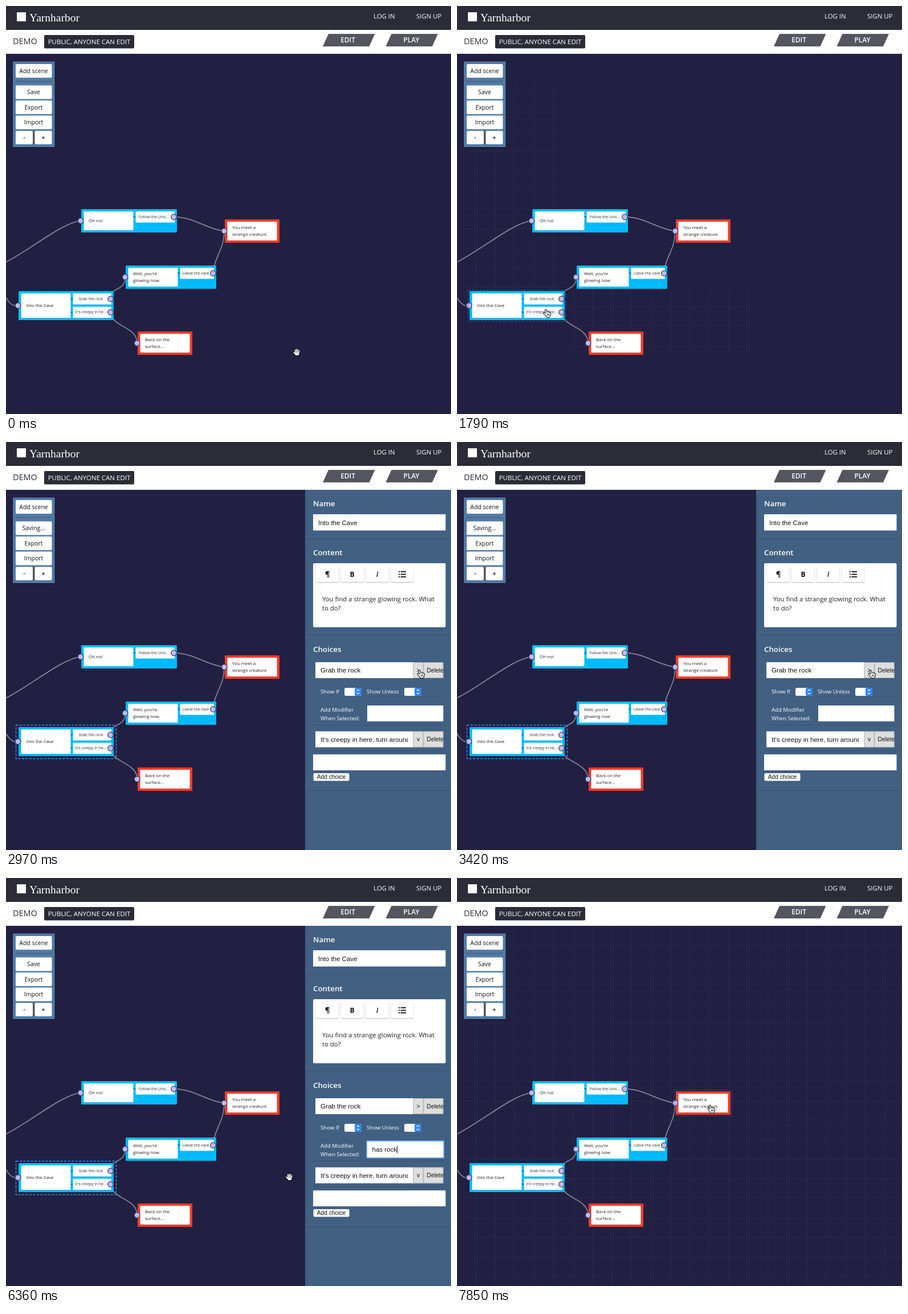
An HTML page with a canvas for the animation above (8000 ms loop, 781 px wide and 717 px high).

```html
<!DOCTYPE html>
<html lang="en">
<head>
<meta charset="utf-8">
<title>Scene editor</title>
<style>
  html, body { margin: 0; width: 100%; height: 100%; overflow: hidden; background: #222042; }
  canvas { display: block; width: 781px; height: 717px; }
</style>
</head>
<body>
<canvas id="stage"></canvas>
<script>
const W = 781, H = 717, LOOP = 8000, TICK = 148, LAST_TICK = 53;
const OPEN = 13, EXPAND = 20, FOCUS = 28, CLOSE = 43;
const UI = '"Open Sans", "Noto Sans", sans-serif';
const FORM = '"Liberation Sans", Arial, sans-serif';
const BLUE = '#00baff', RED = '#f43d2c';

const canvas = document.getElementById('stage');
const ctx = canvas.getContext('2d');
const ratio = window.devicePixelRatio || 1;
canvas.width = W * ratio;
canvas.height = H * ratio;

// Boxes are given by their edges: left, top, right, bottom.
function box(x1, y1, x2, y2, fill, r = 0) {
  ctx.fillStyle = fill;
  ctx.beginPath();
  ctx.roundRect(x1, y1, x2 - x1, y2 - y1, r);
  ctx.fill();
}

function frame(x1, y1, x2, y2, color, width = 1, dash = []) {
  ctx.strokeStyle = color;
  ctx.lineWidth = width;
  ctx.setLineDash(dash);
  ctx.strokeRect(x1, y1, x2 - x1, y2 - y1);
  ctx.setLineDash([]);
}

function shape(points, fill) {
  ctx.fillStyle = fill;
  ctx.beginPath();
  points.forEach(([x, y]) => ctx.lineTo(x, y));
  ctx.closePath();
  ctx.fill();
}

function line(x1, y1, x2, y2, color, width = 1) {
  ctx.strokeStyle = color;
  ctx.lineWidth = width;
  ctx.beginPath();
  ctx.moveTo(x1, y1);
  ctx.lineTo(x2, y2);
  ctx.stroke();
}

// y is the middle of the capital letters.
function text(str, x, y, size, { color = '#111', font = UI, weight = 400, align = 'left', style = '' } = {}) {
  ctx.font = `${style} ${weight} ${size}px ${font}`;
  ctx.fillStyle = color;
  ctx.textAlign = align;
  ctx.fillText(str, x, y + size * 0.36);
}

function clipped(x1, y1, x2, y2, draw) {
  ctx.save();
  ctx.beginPath();
  ctx.rect(x1, y1, x2 - x1, y2 - y1);
  ctx.clip();
  draw();
  ctx.restore();
}

const inside = (p, [x1, y1, x2, y2]) => p.x >= x1 && p.x <= x2 && p.y >= y1 && p.y <= y2;

// ---- Story map ----

const nodes = [
  { box: [132, 357, 300, 398], lines: ['Oh no!'], choices: ['Follow the Unic...'] },
  { box: [210, 456, 369, 497], lines: ["Well, you're", 'glowing now'], choices: ['Leave the cave'] },
  { box: [22, 501, 189, 552], lines: ['Into the Cave'], choices: ['Grab the rock', "It's creepy in he..."] },
  { box: [384, 375, 480, 416], lines: ['You meet a', 'strange creature'], choices: [] },
  { box: [231, 572, 327, 613], lines: ['Back on the', 'surface...'], choices: [] }
];

const links = [
  'M-4 452C42 430 95 382 131 377.5',
  'M-3 507C4 521 10 527 20 527',
  'M294 370.5C330 371 352 392 383 395.5',
  'M363 469C366 440 383 428 383 395.5',
  'M183 515C184 491 209 503 209.5 476',
  'M183 538C186 565 229 562 230.5 592.5'
].map(d => new Path2D(d));

function port(x, y) {
  ctx.beginPath();
  ctx.arc(x, y, 4.8, 0, Math.PI * 2);
  ctx.fillStyle = '#bcbcf6';
  ctx.fill();
  ctx.strokeStyle = '#34345a';
  ctx.lineWidth = 1.2;
  ctx.stroke();
}

function drawNode({ box: [x1, y1, x2, y2], lines, choices }) {
  const mid = (y1 + y2) / 2;
  box(x1, y1, x2, y2, choices.length ? BLUE : RED, 1.5);
  box(x1 + 4.5, y1 + 4, x1 + 91.5, y2 - 4, '#fff', 1);
  lines.forEach((str, i) => text(str, x1 + 13, mid + (i - (lines.length - 1) / 2) * 12, 7.9, { color: '#222' }));
  choices.forEach((str, i) => {
    const top = y1 + 4 + i * 23.5;
    line(x1 + 91.5, top + 9.5, x1 + 96, top + 9.5, '#1d4c70', 1.4);
    box(x1 + 95.5, top, x2 - 4, top + 19.5, '#fff', 1);
    text(str, (x1 + x2) / 2 + 43.5, top + 9.5, 6.8, { color: '#333', align: 'center' });
    port(x2 - 5.5, top + 9.7);
  });
  port(x1 - 1, mid);
}

function drawGrid() {
  for (let x = 33; x < W; x += 34.2) line(x, 84, x, H, '#2b2a4d');
  for (let y = 118; y < H; y += 34.2) line(14, y, W, y, '#2b2a4d');
}

function drawMap(n) {
  box(0, 84, W, H, '#222042');
  if (n >= CLOSE) drawGrid();
  if (n === OPEN - 1) {
    clipped(14, 135, 193, 500, drawGrid);
    clipped(193, 498, 517, 615, drawGrid);
  }
  ctx.strokeStyle = '#92919f';
  ctx.lineWidth = 1.5;
  links.forEach(path => ctx.stroke(path));
  nodes.forEach(drawNode);
  if (n === OPEN - 1) frame(19.5, 499.5, 190.5, 554.5, '#28649f', 1, [4, 2.5]);
  if (n >= OPEN && n < CLOSE) frame(17.5, 497.5, 193.5, 556.5, '#2497e8', 1.5, [4, 2.5]);
  if (n >= LAST_TICK) frame(381.5, 372.5, 482.5, 418.5, '#4a4668', 1, [2, 2]);
}

// ---- Header and tools ----

function drawHeader() {
  box(0, 0, W, 42, '#2b2c37');
  box(19, 11, 35, 27, '#fff');
  text('Yarnharbor', 41, 20, 19.5, { color: '#fff', font: '"Liberation Serif", "Noto Serif", serif' });
  text('LOG IN', 645, 17.5, 11.4, { color: '#fff' });
  text('SIGN UP', 720, 17.5, 11.4, { color: '#fff' });
  box(0, 42, W, 84, '#fff');
  text('DEMO', 12, 62, 14.4, { color: '#2b2c37' });
  box(67, 51, 225, 74.5, '#2b2b37', 2);
  text('PUBLIC, ANYONE CAN EDIT', 146, 63, 11.5, { color: '#fff', align: 'center' });
  [['EDIT', 556, 600], ['PLAY', 666.5, 711.5]].forEach(([str, x, mid]) => {
    shape([[x + 10, 49], [x + 91.5, 49], [x + 81.5, 71], [x, 71]], '#555560');
    text(str, mid, 60, 11.9, { color: '#fff', weight: 600, align: 'center' });
  });
}

function drawTools(saving) {
  ctx.save();
  ctx.shadowColor = 'rgba(0,0,0,.4)';
  ctx.shadowBlur = 3;
  ctx.shadowOffsetY = 1;
  box(12, 97.5, 85.5, 248, '#527aa4', 1);
  ctx.restore();
  line(17, 132.5, 80, 132.5, '#426383', 1.5);
  const labels = [['Add scene', 114], [saving ? 'Saving...' : 'Save', 151.5], ['Export', 178], ['Import', 204.5]];
  labels.forEach(([str, y]) => {
    box(17, y - 12, 80.5, y + 12, '#fff', 2);
    text(str, 48.5, y, 10.5, { align: 'center' });
  });
  box(44, 220, 54, 243, '#555560');
  box(17, 219.5, 47, 243, '#fff', 2);
  box(50.5, 219.5, 80.5, 243, '#fff', 2);
  text('-', 32, 231.5, 11, { align: 'center', weight: 600 });
  text('+', 65.5, 231.5, 11, { align: 'center', weight: 600 });
}

// ---- Side panel ----

const divider = (y, x1 = 525, x2 = W) => line(x1, y + 0.5, x2, y + 0.5, '#38536f');

function grayButton(x1, y1, x2, y2, str, mid) {
  box(x1, y1, x2, y2, '#dedede');
  frame(x1 + 0.5, y1 + 0.5, x2 - 0.5, y2 - 0.5, '#b4b4b4');
  clipped(x1, y1, x2, y2, () => text(str, mid, (y1 + y2) / 2, 10.3, { font: FORM, align: 'center' }));
}

function choiceRow(y, str, mark) {
  box(543, y, 715, y + 28, '#fff');
  clipped(543, y, 706, y + 28, () => text(str, 552, y + 14, 11.6, { font: FORM }));
  grayButton(714.5, y, 732.5, y + 28, mark, 723.5);
  grayButton(732.5, y, 767.5, y + 28, 'Delete', 753.5);
}

function select(x) {
  box(x, 432, x + 30, 446, '#fff', 2.5);
  box(x + 18, 432, x + 30, 446, '#2f86f2', 2.5);
  const mid = x + 24;
  [-1, 1].forEach(d => {
    ctx.strokeStyle = '#fff';
    ctx.lineWidth = 1.2;
    ctx.beginPath();
    ctx.moveTo(mid - 2.3, 439 + d * 1.7);
    ctx.lineTo(mid, 439 + d * 4);
    ctx.lineTo(mid + 2.3, 439 + d * 1.7);
    ctx.stroke();
  });
}

function drawEditor() {
  box(539, 213, 771.5, 325.5, '#fff', 2);
  for (let i = 0; i < 4; i++) {
    const x = 544 + i * 43.8;
    ctx.save();
    ctx.shadowColor = 'rgba(0,0,0,.3)';
    ctx.shadowBlur = 2;
    ctx.shadowOffsetY = 1;
    box(x, 218, x + 39.5, 246, '#fff', 1);
    ctx.restore();
  }
  text('¶', 564, 232.5, 13, { weight: 700, align: 'center' });
  text('B', 607.5, 232.5, 12, { weight: 700, align: 'center' });
  text('I', 651.5, 232.5, 12, { weight: 600, align: 'center', style: 'italic' });
  [228, 232.5, 237].forEach(y => {
    box(689, y - 0.9, 691, y + 0.9, '#111');
    box(692.5, y - 0.9, 702, y + 0.9, '#111');
  });
  text('You find a strange glowing rock. What', 555, 275.5, 11.3, { color: '#222' });
  text('to do?', 555, 291.5, 11.3, { color: '#222' });
}

function drawModifiers(n) {
  const label = { color: '#fff' };
  text('Show If', 552, 439, 9.6, label);
  select(594);
  text('Show Unless', 633, 439, 9.6, label);
  select(699);
  text('Add Modifier', 552, 470.5, 9.6, label);
  text('When Selected:', 552, 485.5, 9.6, label);
  if (n >= FOCUS) {
    box(632, 461, 769.5, 493, '#4d97ee', 2.5);
    box(633.3, 462.3, 768.2, 491.7, '#86bbf8', 1.5);
  }
  box(634, 463, 767.5, 491, '#fff');
  if (n < FOCUS) return;
  const typed = ['', 'h', 'ha', 'has', 'has r', 'has ro', 'has rock'][Math.max(0, Math.min(6, n - 30))];
  text(typed, 642.5, 477, 11.5, { font: FORM });
  const caret = 643 + ctx.measureText(typed).width;
  line(caret, 470.5, caret, 484, '#111');
}

function drawPanel(n) {
  const expanded = n >= EXPAND, shift = expanded ? 77 : 0;
  const title = { color: '#fff', weight: 600 };
  box(525, 84, W, H, '#416082');
  text('Name', 539, 108, 13.3, title);
  box(539, 127, 771.5, 155.5, '#fff');
  text('Into the Cave', 548, 141.5, 11.5, { font: FORM });
  divider(169);
  text('Content', 539, 194, 13.3, title);
  drawEditor();
  divider(339);
  text('Choices', 539, 364, 13.3, title);
  choiceRow(387, 'Grab the rock', expanded ? '>' : 'v');
  if (expanded) drawModifiers(n);
  divider(420 + shift, 539, 771);
  choiceRow(431.5 + shift, "It's creepy in here, turn around", 'v');
  divider(465 + shift, 539, 771);
  box(539, 472 + shift, 771.5, 500 + shift, '#fff');
  box(539.5, 505 + shift, 602.5, 518.5 + shift, '#fff', 2);
  text('Add choice', 571, 511.7 + shift, 10.2, { font: FORM, align: 'center' });
  divider(535 + shift);
}

// ---- Mouse ----

// Each move: first tick, number of steps, end point, optional bend point.
const moves = [
  { at: 3, steps: 8, to: [158, 539], bend: [310, 372] },
  { at: 14, steps: 6, to: [728, 407] },
  { at: 24, steps: 4, to: [699, 487] },
  { at: 39, steps: 4, to: [497, 525] },
  { at: 47, steps: 5, to: [446, 405] }
];

function mouseAt(n) {
  let [x, y] = [510, 608];
  for (const { at, steps, to, bend } of moves) {
    if (n < at) break;
    const p = Math.min(1, (n - at + 1) / steps), u = p * p * (3 - 2 * p);
    const [bx, by] = bend || [(x + to[0]) / 2, (y + to[1]) / 2];
    const mix = (a, b, c) => a * (1 - u) ** 2 + 2 * b * u * (1 - u) + c * u * u;
    [x, y] = [mix(x, bx, to[0]), mix(y, by, to[1])];
  }
  return { x, y };
}

function hand(fingers, palm) {
  ctx.lineCap = ctx.lineJoin = 'round';
  [['#000', 3.6], ['#fff', 1.8]].forEach(([color, width]) => {
    fingers.forEach(f => line(...f, color, width));
    shape(palm, color);
    ctx.strokeStyle = color;
    ctx.lineWidth = width;
    ctx.stroke();
  });
}

const cursors = {
  grab() {
    hand([[-2.6, -3.5, -1.6, 1], [0, -4.6, 0.2, 1], [2.6, -4, 2, 1], [4.8, -1.8, 3.6, 2], [-5, 0.2, -2.5, 3.5]],
      [[-2, 1], [3.6, 1], [3, 5.2], [-1, 5.2]]);
    [-0.9, 1.2, 3].forEach(x => line(x, -2, x, 2, '#555', 0.6));
  },
  pointer() {
    hand([[-2.2, -4.6, -1, 2], [0.8, -1, 1, 2], [3, -0.4, 3, 2], [5, 0.6, 5, 3], [-4.6, 0.6, -2, 4]],
      [[-1.5, 2], [5, 2], [3.8, 6.6], [-0.4, 6.6]]);
    [0.5, 2.2, 3.9].forEach(x => line(x, 2, x, 5, '#222', 0.8));
  },
  beam() {
    [['#fff', 2], ['#111', 1]].forEach(([color, width]) => {
      line(0, -5, 0, 5, color, width);
      line(-2.5, -6, 0, -5, color, width);
      line(2.5, -6, 0, -5, color, width);
      line(-2.5, 6, 0, 5, color, width);
      line(2.5, 6, 0, 5, color, width);
      line(-1.5, 2.5, 1.5, 2.5, color, width);
    });
  },
  arrow() {
    const tip = [[-4, -6], [-4, 5], [-1.4, 2.7], [0.4, 6.4], [2, 5.6], [0.4, 2.2], [4, 2]];
    shape(tip, '#000');
    ctx.strokeStyle = '#fff';
    ctx.lineWidth = 0.9;
    ctx.stroke();
  }
};

function cursorFor(p, n) {
  if (n >= OPEN && n < CLOSE && p.x >= 525) {
    if (inside(p, [715, 387, 767, 415])) return 'pointer';
    if (n >= EXPAND && inside(p, [634, 463, 767, 491])) return 'beam';
    return 'arrow';
  }
  return nodes.some(node => inside(p, node.box)) ? 'pointer' : 'grab';
}

function drawMouse(n) {
  const p = mouseAt(n);
  ctx.save();
  ctx.translate(p.x, p.y);
  cursors[cursorFor(p, n)]();
  ctx.restore();
}

function render() {
  const t = performance.now() % LOOP;
  const n = Math.min(LAST_TICK, Math.floor((t + 2) / TICK));
  ctx.setTransform(ratio, 0, 0, ratio, 0, 0);
  drawMap(n);
  drawHeader();
  drawTools(n >= EXPAND && n < 25);
  if (n >= OPEN && n < CLOSE) drawPanel(n);
  drawMouse(n);
  requestAnimationFrame(render);
}
render();
</script>
</body>
</html>
```
